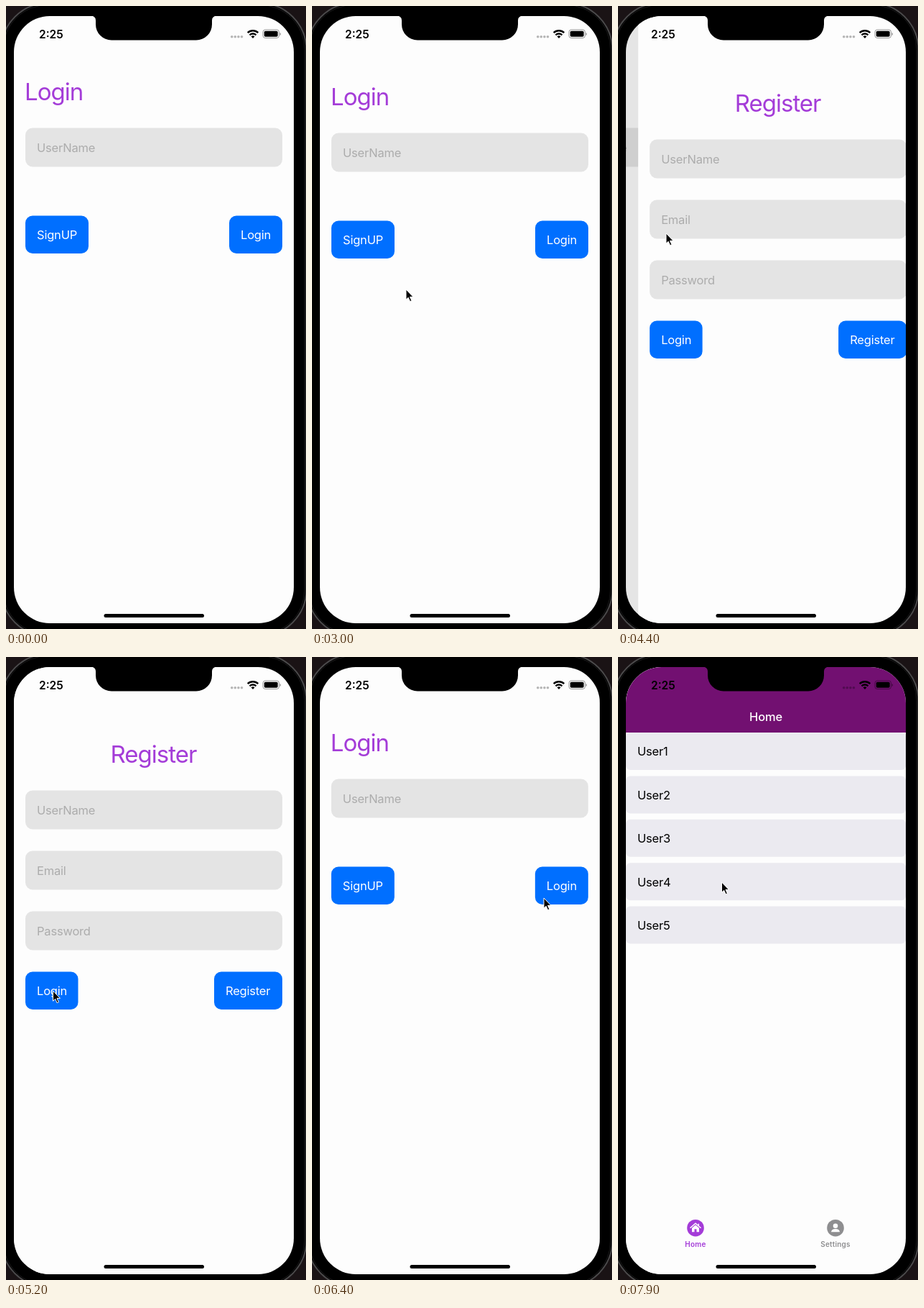
An HTML page that plays this animation: 418 by 866 pixels, repeating every 8000 ms.

```html
<!DOCTYPE html>
<html lang="en">
<head>
<meta charset="utf-8">
<title>Login flow</title>
<style>
  html, body { margin: 0; width: 100%; height: 100%; overflow: hidden; background: #1a1315; }
  svg { display: block; width: 418px; height: 866px; font-family: Inter, "Liberation Sans", sans-serif; }
  text { font-size: 16.5px; letter-spacing: -.2px; }
  .title { font-size: 33px; letter-spacing: -1px; fill: #a43cd8; }
  .hint { fill: #acacac; }
  .light { fill: #fff; }
  .mid { text-anchor: middle; }
  .tab { font-size: 10px; font-weight: 600; letter-spacing: .2px; text-anchor: middle; }
</style>
</head>
<body>
<svg viewBox="0 0 418 866">
  <defs>
    <clipPath id="screen"><rect x="11" y="14" width="390" height="844" rx="50"/></clipPath>
  </defs>
  <rect x="-6.5" y="-4" width="425" height="880" rx="65" fill="#000" stroke="#4b4a4b" stroke-width="2"/>
  <rect x="-4" y="-1.5" width="420" height="875" rx="62" fill="#000" stroke="#1c1b1c"/>
  <g clip-path="url(#screen)">
    <g id="login"></g>
    <rect id="shade" x="11" y="14" width="390" height="844" opacity="0"/>
    <g id="register"></g>
    <g id="home"></g>
  </g>
  <path d="M118 12V13.5Q125 14 125 20V25.500A22 22 0 0 0 147 47.500H265A22 22 0 0 0 287 25.500V20Q287 14 294 13.500V12Z"/>
  <text x="46" y="44.500" style="font-size:15.500px;font-weight:600;letter-spacing:0">2:25</text>
  <g opacity=".28">
    <circle cx="314.700" cy="42.700" r="1.800"/><circle cx="319.300" cy="42.700" r="1.800"/>
    <circle cx="323.900" cy="42.700" r="1.800"/><circle cx="328.500" cy="42.700" r="1.800"/>
  </g>
  <g fill="none" stroke="#000" stroke-width="2.300">
    <path d="M336.700 37.200A10.500 10.500 0 0 1 351.300 37.200"/>
    <path d="M339.500 40.300A6.500 6.500 0 0 1 348.500 40.300"/>
  </g>
  <path d="M344 45L341.500 42.300A3.700 3.700 0 0 1 346.500 42.300Z"/>
  <rect x="358" y="33" width="22.500" height="11.500" rx="3.300" fill="none" stroke="#000" stroke-opacity=".4"/>
  <rect x="359.700" y="34.700" width="19" height="8" rx="1.800"/>
  <path d="M381.700 37V41Q383 40.500 383 39T381.700 37Z" opacity=".45"/>
  <rect x="136.500" y="845" width="139.500" height="5" rx="2.500"/>
  <path id="cursor" d="M0 0V14.200L3.200 11.300L5.600 16.700L7.900 15.700L5.500 10.400H10Z" stroke="#fff" stroke-width="1" stroke-linejoin="round"/>
</svg>
<script>
const $ = id => document.getElementById(id);
const LOOP = 8000, STEP = 100, WIDTH = 390;

const page = '<rect x="11" y="14" width="390" height="844" fill="#fdfdfd"/>';
const label = (x, y, s, cls = '') => `<text x="${x}" y="${y}" class="${cls}">${s}</text>`;
const field = (y, s) =>
  `<rect x="27" y="${y}" width="358" height="54" rx="10" fill="#e4e4e4"/>` + label(43, y + 33, s, 'hint');
const button = (id, x, y, w, s) =>
  `<g id="${id}"><rect x="${x}" y="${y}" width="${w}" height="52.5" rx="10" fill="#006fff"/>` +
  label(x + 16, y + 32.3, s, 'light') + '</g>';
const row = i => {
  const y = 105 + i * 60.4;
  return `<rect x="11" y="${y}" width="390" height="52" rx="6" fill="#ebeaf0"/>` + label(27, y + 32.3, 'User' + (i + 1));
};
const tab = (x, color, s, icon) =>
  `<g fill="${color}"><circle cx="${x}" cy="793.7" r="11.8"/>${label(x, 820, s, 'tab')}</g>` +
  `<g transform="translate(${x} 793.7)" fill="#fff">${icon}</g>`;

$('login').innerHTML = page + '<g id="form">' + label(26, 131, 'Login', 'title') +
  field(169.5, 'UserName') + button('signUp', 27, 291.5, 88, 'SignUP') +
  button('enter', 311, 291.5, 74, 'Login') + '</g>';

$('register').innerHTML = page + label(205.5, 147, 'Register', 'title mid') +
  field(185.5, 'UserName') + field(269.5, 'Email') + field(353.5, 'Password') +
  button('back', 27, 437.5, 73.5, 'Login') + button('submit', 290, 437.5, 95, 'Register');

const house = '<path d="M-7.500 0L0 -6.500L7.500 0" fill="none" stroke="#fff" stroke-width="1.500"/>' +
  '<path d="M-5 0L0 -4.300L5 0V5.500H1.500V1.500H-1.500V5.500H-5ZM3.500 -6H5V-2L3.500 -3.300Z"/>';
const person = '<circle cy="-3" r="3.300"/><path d="M-6 5.500Q-5.500 1.200 0 1.200T6 5.500Z"/>';
$('home').innerHTML = page + '<rect x="11" y="14" width="390" height="91" fill="#721071"/>' +
  '<g style="font-weight:500">' + label(206, 89, 'Home', 'light mid') + '</g>' +
  [0, 1, 2, 3, 4].map(row).join('') +
  tab(108, '#a43cd8', 'Home', house) + tab(303, '#8e8e90', 'Settings', person);

// [time, x, y] of the pointer tip
const trail = [
  [400, 236, 572], [600, 83, 455], [900, 83, 455], [1200, 45, 322], [1500, 60, 318],
  [1900, 343, 321], [2000, 345, 320], [2300, 190, 385], [2700, 150, 560], [3000, 131, 394],
  [3500, 66, 312], [3600, 67, 309], [3900, 67, 316], [4700, 67, 316], [5200, 65.5, 464],
  [5900, 65.5, 464], [6400, 323, 335], [6500, 316, 324], [6700, 350, 311],
  [7200, 350, 311], [7900, 144.5, 313]
];

const clamp = v => Math.min(1, Math.max(0, v));
const smooth = v => (v = clamp(v), v * v * (3 - 2 * v));
const spring = ms => {
  const x = Math.max(0, ms) * .014;
  return 1 - (1 + x) * Math.exp(-x);
};
const move = (id, x, y) => $(id).setAttribute('transform', `translate(${x.toFixed(2)} ${y.toFixed(2)})`);
const fade = (id, v) => $(id).setAttribute('opacity', v.toFixed(3));
const show = (id, on) => $(id).setAttribute('visibility', on ? 'visible' : 'hidden');

function pointer(t) {
  const i = trail.findIndex(k => k[0] > t);
  if (i < 0) return trail[trail.length - 1].slice(1);
  const a = trail[Math.max(0, i - 1)], b = trail[i];
  const p = smooth((t - a[0]) / (b[0] - a[0] || 1));
  return [a[1] + (b[1] - a[1]) * p, a[2] + (b[2] - a[2]) * p];
}

// Dim quickly on press, then recover slowly
function press(t, at) {
  const d = t - at;
  if (d < 0) return 1;
  return d < 100 ? .6 : .2 + .8 * clamp((d - 100) / 600);
}

function draw(t) {
  const reg = spring(t - 4050) * (1 - spring(t - 5760));
  const home = spring(t - 6960);
  const cover = Math.max(reg, home);
  move('login', -.3 * WIDTH * cover, 0);
  move('shade', -.3 * WIDTH * cover, 0);
  fade('shade', .1 * cover);
  move('register', WIDTH * (1 - reg), 0);
  move('home', WIDTH * (1 - home), 0);
  show('register', reg > .001);
  show('home', home > .001);

  // Pull down, then bounce back
  const pull = 90 * (t < 2700 ? smooth((t - 2300) / 400) : 1 - spring(t - 2700));
  move('form', 0, pull);

  fade('signUp', press(t, 3900));
  fade('back', press(t, 5700));
  fade('enter', press(t, 6900));
  move('cursor', ...pointer(t));
  show('cursor', t >= 400);
}

const start = performance.now();
function tick() {
  const t = (performance.now() - start) % LOOP;
  draw(Math.floor(t / STEP) * STEP);
  requestAnimationFrame(tick);
}
tick();
</script>
</body>
</html>
```
